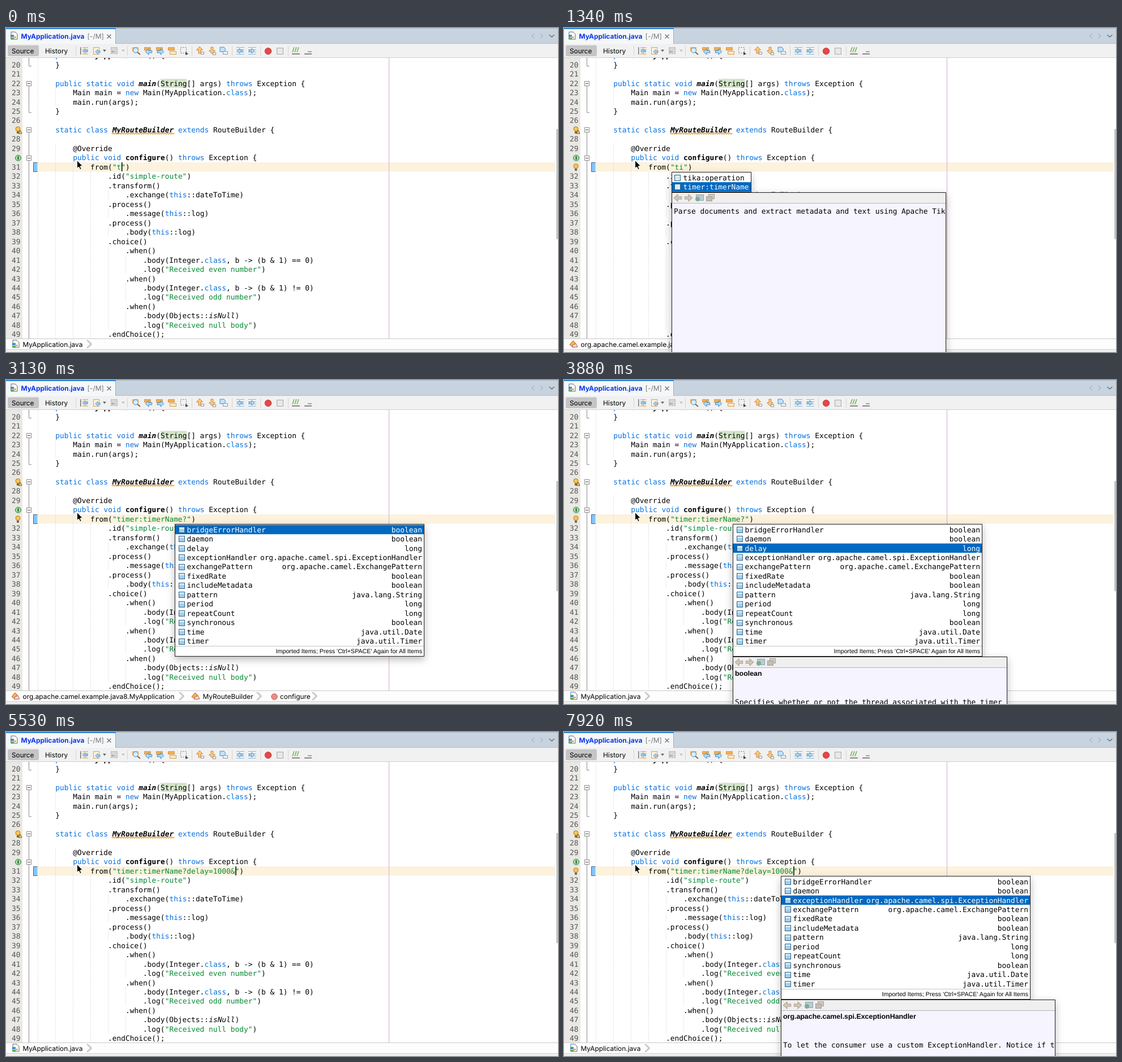
These frames come from a looping animation (975x574 px, 8000 ms). An HTML page with a canvas:

```html
<!DOCTYPE html>
<html lang="en">
<head>
<meta charset="utf-8">
<title>Code completion</title>
<style>
  html, body { margin: 0; width: 100%; height: 100%; overflow: hidden; background: #fff; }
  canvas { display: block; }
</style>
</head>
<body>
<canvas id="stage" width="975" height="574"></canvas>
<script>
const ctx = document.getElementById('stage').getContext('2d');
const LOOP = 8000, CHAR = 7.74, ROW = 16.475, LEFT = 56.3, FIRST_LINE = 19;
const MONO = '12.857px "DejaVu Sans Mono", monospace';
const SANS = '"Liberation Sans", Arial, sans-serif';
const UI = 'Inter, sans-serif';
const BLUE = '#0570df', GREEN = '#078a35', ORANGE = '#f5ad4e', ICON_BLUE = '#3d8fd1';

const source = `    private MyApplication() {
    }

    public static void main(String[] args) throws Exception {
        Main main = new Main(MyApplication.class);
        main.run(args);
    }

    static class MyRouteBuilder extends RouteBuilder {

        @Override
        public void configure() throws Exception {
            from("URI")
                .id("simple-route")
                .transform()
                    .exchange(this::dateToTime)
                .process()
                    .message(this::log)
                .process()
                    .body(this::log)
                .choice()
                    .when()
                        .body(Integer.class, b -> (b & 1) == 0)
                        .log("Received even number")
                    .when()
                        .body(Integer.class, b -> (b & 1) != 0)
                        .log("Received odd number")
                    .when()
                        .body(Objects::isNull)
                        .log("Received null body")
                .endChoice();`.split('\n');

const options = `bridgeErrorHandler boolean
daemon boolean
delay long
exceptionHandler org.apache.camel.spi.ExceptionHandler
exchangePattern org.apache.camel.ExchangePattern
fixedRate boolean
includeMetadata boolean
pattern java.lang.String
period long
repeatCount long
synchronous boolean
time java.util.Date
timer java.util.Timer`.split('\n').map(line => line.split(' '));

const docs = {
  tika: ['', 'Parse documents and extract metadata and text using Apache Tika.'],
  timer: ['', 'Generate messages in specified intervals using java.util.Timer.'],
  bridge: ['boolean', 'Allows for bridging the consumer to the Camel routing Error Handler'],
  daemon: ['boolean', 'Specifies whether or not the thread associated with the timer endpoint'],
  delay: ['long', 'Delay before first event is triggered.'],
  exception: ['org.apache.camel.spi.ExceptionHandler', 'To let the consumer use a custom ExceptionHandler. Notice if the']
};

const uriList = { x: 190, w: 141, items: [['tika:operation', ''], ['timer:timerName', '']] };
const fullList = { x: 298, w: 441, items: options, footer: true };
const restList = { x: 383, w: 441, items: options.filter(o => o[0] !== 'delay'), footer: true };
const closed = { list: null, doc: null, bulb: false, crumbs: false };

// Each step changes part of the editor state from its time on.
const steps = [
  [0, { uri: 't', ...closed }],
  [150, { uri: 'ti' }],
  [450, { crumbs: true, bulb: true }],
  [900, { list: uriList, sel: 0, doc: 'tika' }],
  [1340, { sel: 1 }],
  [1490, { doc: 'timer' }],
  [1930, { uri: 'timer:timerName', ...closed }],
  [2380, { crumbs: true, bulb: true }],
  [2830, { uri: 'timer:timerName?', ...closed }],
  [3130, { list: fullList, sel: 0, crumbs: true, bulb: true }],
  [3280, { crumbs: false }],
  [3430, { doc: 'bridge' }],
  [3580, { sel: 1 }],
  [3730, { doc: 'daemon' }],
  [3880, { sel: 2 }],
  [4030, { doc: 'delay' }],
  [4330, { uri: 'timer:timerName?delay=1000', ...closed }],
  [4630, { crumbs: true, bulb: true }],
  [5380, { crumbs: false, bulb: false }],
  [5530, { uri: 'timer:timerName?delay=1000&' }],
  [5830, { list: restList, sel: 0, bulb: true }],
  [6130, { doc: 'bridge' }],
  [6720, { sel: 1 }],
  [7020, { doc: 'daemon' }],
  [7320, { sel: 2 }],
  [7620, { doc: 'exception' }]
];
const blinkStarts = [0, 200, 1930, 2830, 4330, 5520];

const stateAt = t => Object.assign({}, ...steps.filter(s => s[0] <= t).map(s => s[1]));
const caretOn = t => {
  const start = blinkStarts.filter(b => b <= t).pop();
  return Math.floor((t - start) / 300) % 2 === 0;
};
const rowY = n => 65 + (n - 20) * ROW;
const colX = c => LEFT + c * CHAR;

function rect(x, y, w, h, fill) {
  ctx.fillStyle = fill;
  ctx.fillRect(x, y, w, h);
}
function frame(x, y, w, h, stroke, fill) {
  if (fill) rect(x, y, w, h, fill);
  ctx.strokeStyle = stroke;
  ctx.lineWidth = 1;
  ctx.strokeRect(x + .5, y + .5, w - 1, h - 1);
}
function line(points, stroke, width = 1) {
  ctx.beginPath();
  points.forEach(p => ctx.lineTo(...p));
  ctx.strokeStyle = stroke;
  ctx.lineWidth = width;
  ctx.stroke();
}
function shape(points, fill, stroke) {
  ctx.beginPath();
  points.forEach(p => ctx.lineTo(...p));
  ctx.closePath();
  ctx.fillStyle = fill;
  ctx.fill();
  if (stroke) { ctx.strokeStyle = stroke; ctx.lineWidth = 1; ctx.stroke(); }
}
function disc(x, y, r, fill, stroke) {
  ctx.beginPath();
  ctx.arc(x, y, r, 0, 7);
  ctx.fillStyle = fill;
  ctx.fill();
  if (stroke) { ctx.strokeStyle = stroke; ctx.lineWidth = 1; ctx.stroke(); }
}
// y is the middle of the capital letters.
function text(str, x, y, font, fill = '#000', align = 'left') {
  ctx.font = font;
  ctx.textAlign = align;
  ctx.fillStyle = fill;
  ctx.fillText(str, x, y + 4.6);
}
function clipped(x, y, w, h, draw) {
  ctx.save();
  ctx.beginPath();
  ctx.rect(x, y, w, h);
  ctx.clip();
  draw();
  ctx.restore();
}
// An arrow centred on x, y; turn counts quarter turns from pointing right.
function arrow(x, y, turn, fill, stroke, s = 1) {
  ctx.save();
  ctx.translate(x, y);
  ctx.rotate(turn * Math.PI / 2);
  ctx.scale(s, s);
  shape([[-6, -2], [0, -2], [0, -5.5], [6, 0], [0, 5.5], [0, 2], [-6, 2]], fill, stroke);
  ctx.restore();
}

function fileIcon(x, y) {
  shape([[x - 5, y - 7], [x + 2, y - 7], [x + 6, y - 3], [x + 6, y + 6], [x - 5, y + 6]], '#fff', '#5b6b7c');
  rect(x - 6, y - 2, 6, 4, ICON_BLUE);
  rect(x - 1, y + 1, 5, 3, ORANGE);
  rect(x - 6, y + 3, 6, 3, '#67a84b');
}
function classIcon(x, y) {
  shape([[x - 7, y + 1], [x - 1, y - 6], [x + 3, y - 2], [x - 2, y + 5]], '#f3b35a', '#a96a2a');
  shape([[x - 2, y + 2], [x + 4, y - 1], [x + 7, y + 5], [x - 2, y + 6]], '#f7d8cf', '#b55c48');
}
function bulbIcon(x, y) {
  disc(x, y - 1.5, 4, '#fbc54e', '#b9780f');
  rect(x - 2, y + 3, 4, 3.5, '#66605a');
}

function codeFont(word) {
  if (/^(main|MyRouteBuilder)$/.test(word)) return 'italic bold ' + MONO;
  if (/^(configure|MyApplication)$/.test(word)) return 'bold ' + MONO;
  return word === 'isNull' ? 'italic ' + MONO : MONO;
}
const tokens = /"[^"]*"|\b(?:private|public|static|void|throws|new|class|extends|this)\b|\bmain(?=\(S)|MyRouteBuilder|configure|MyApplication(?=\(\))|isNull|[^\s"]|\s+/g;

function codeLine(str, y) {
  let col = 0, run = '', runCol = 0;
  const flush = () => { if (run) text(run, colX(runCol), y, MONO); run = ''; };
  for (const token of str.match(tokens) || []) {
    if (token.length > 1 && token.trim()) {
      flush();
      const font = codeFont(token);
      const plain = font !== MONO;
      text(token, colX(col), y, font, token[0] === '"' ? GREEN : plain ? '#000' : BLUE);
    } else {
      if (!run) runCol = col;
      run += token;
    }
    col += token.length;
  }
  flush();
}

function foldColumn() {
  const gray = '#8c8c8c';
  const end = n => line([[40.5, rowY(n)], [40.5, rowY(n) + 2.5], [45, rowY(n) + 2.5]], gray);
  line([[40.5, 53], [40.5, rowY(20)]], gray);
  line([[40.5, rowY(22)], [40.5, rowY(25)]], gray);
  line([[40.5, rowY(27)], [40.5, 550]], gray);
  [20, 25].forEach(end);
  for (const n of [22, 27, 30]) {
    const y = Math.round(rowY(n));
    frame(36, y - 4, 9, 9, gray, '#fff');
    line([[38, y + .5], [43, y + .5]], '#444');
  }
}

function editor(state, t) {
  rect(0, 53, 975, 497, '#fff');
  rect(0, 53, 29, 497, '#e9e8e4');
  rect(57, 238, 913, 16.5, '#fcf2dd');
  rect(48, 238, 7.5, 17, '#83c5fb');
  line([[55.5, 238.5], [48.5, 238.5], [48.5, 254.5], [55.5, 254.5]], '#41678a');
  rect(273, 90, 46.5, 16, '#d3e5c9');

  let indent = 4;
  source.forEach((str, i) => {
    const n = FIRST_LINE + i, y = rowY(n);
    if (str) indent = str.search(/\S/);
    ctx.setLineDash([1, 1]);
    for (let c = 0; c < indent; c += 4) {
      const x = Math.round(colX(c)) + .5;
      line([[x, y - 8], [x, y + 8]], '#d9d9d9');
    }
    ctx.setLineDash([]);
    codeLine(str.replace('URI', state.uri), y);
    if (n === 27) bulbIcon(21, y);
    else if (n === 30) {
      disc(21.5, y + .5, 5, '#a9dba4', '#1c7a31');
      rect(20.6, y - 2.5, 1.9, 6, '#14602a');
    } else if (n === 31 && state.bulb) bulbIcon(21, y);
    else text(n, 10, y, MONO, '#555');
  });
  shape([[22, 187], [25, 181], [28, 187]], '#ffd84c', '#6d5210');

  const wave = [];
  for (let x = 187; x <= 297; x += 2) wave.push([x, x % 4 === 3 ? 188 : 186]);
  line(wave, '#ea9a22', 1.4);

  foldColumn();
  rect(676, 53, 1, 497, '#d8a9d0');
  rect(972, 179, 3, 195, '#c4c4c4');
  if (caretOn(t)) rect(colX(18 + state.uri.length) + .6, 238, 1.5, 16, '#000');
}

function tabBar() {
  rect(0, 0, 975, 28, '#c7d3df');
  rect(0, 0, 975, 1, '#aeb9c4');
  rect(0, 0, 194, 28, '#f5f7f9');
  rect(0, 0, 194, 2, '#2f86d8');
  rect(193, 2, 1, 26, '#a5b2be');
  rect(194, 27, 781, 1, '#b4bec8');
  fileIcon(14, 14);
  text('MyApplication.java', 26.5, 14, `bold 11.9px ${UI}`, '#0a36e8');
  text('[-/M]', 143.5, 14, `12px ${UI}`, '#777');
  line([[178.5, 11.5], [185.5, 18.5]], '#777', 1.4);
  line([[185.5, 11.5], [178.5, 18.5]], '#777', 1.4);
  line([[933, 10], [928.5, 14], [933, 18]], '#aab5bf', 1.2);
  line([[943.5, 10], [948, 14], [943.5, 18]], '#aab5bf', 1.2);
  line([[959.5, 12], [964, 16], [968.5, 12]], '#65717c', 1.4);
}

function toolbar() {
  rect(0, 28, 975, 25, '#f1f1f1');
  rect(0, 52, 975, 1, '#d0d0d0');
  ctx.beginPath();
  ctx.roundRect(3, 30.5, 55, 19.5, 3);
  ctx.fillStyle = '#c5c5c5';
  ctx.fill();
  text('Source', 10, 40, `11.8px ${UI}`);
  text('History', 69, 40, `11.9px ${UI}`);
  for (const x of [123, 214, 328, 399, 449, 498]) rect(x, 32, 1, 17, '#d4d4d4');

  rect(131, 34, 1.5, 13, '#777');
  for (let i = 0; i < 4; i++) rect(135, 34 + i * 3.7, 10, 1.5, ORANGE);
  arrow(140, 40.5, 2, '#9fd0f4', ICON_BLUE, .7);
  frame(154, 34, 11, 13, '#d9a35c', '#fdf0d8');
  arrow(162, 42, 2, '#9fd0f4', ICON_BLUE, .7);
  shape([[171, 38.5], [177, 38.5], [174, 42]], '#555');
  frame(185, 34, 12, 12, '#bbb', '#d6d6d6');
  arrow(189, 42, 2, '#aaa', '#eee', .7);
  shape([[204, 38.5], [210, 38.5], [207, 42]], '#bbb');

  rect(223, 34, 11, 7, ORANGE);
  line([[231, 42], [237, 47]], '#8a642f', 2);
  disc(229, 39.5, 4.5, '#d8eefc', ICON_BLUE);
  for (const [x, turn] of [[251, 2], [272, 0]]) {
    frame(x - 7, 34, 12, 6, '#d99c4a', ORANGE);
    arrow(x + 1, 42, turn, '#b5dcf8', '#2f86c8', .95);
  }
  frame(286, 34, 12, 6, '#d99c4a', ORANGE);
  frame(289, 41, 12, 6, '#d99c4a', '#fdeccb');
  ctx.setLineDash([2, 2]);
  frame(308, 34, 11, 11, '#777');
  ctx.setLineDash([]);
  shape([[317, 42], [322, 46], [317, 48]], '#444');

  arrow(342, 39, 3, '#fbc982', '#c98939', 1);
  arrow(364, 40, 1, '#fbc982', '#c98939', 1);
  frame(344, 42, 6, 5, '#999', '#f4f4f4');
  frame(365, 43, 6, 5, '#999', '#f4f4f4');
  shape([[378, 34], [385, 34], [388, 38], [385, 42], [378, 42]], '#c6e3f7', ICON_BLUE);
  frame(383, 41, 9, 6, '#999', '#f0f0f0');
  for (const [x, turn] of [[413, 2], [434, 0]]) {
    for (let i = 0; i < 4; i++) rect(x - 6, 34 + i * 4, 14, 1, '#8ab4d4');
    arrow(x, 40.5, turn, '#b5dcf8', '#2f86c8', .8);
  }
  disc(463, 41, 5.8, '#e34848', '#c94444');
  frame(478, 35, 12, 12, '#aaa', '#e8e8e8');
  for (let i = 0; i < 3; i++) line([[506 + i * 4, 43], [509 + i * 4, 34]], '#74b565', 1.6);
  rect(505, 45, 14, 2, '#888');
  rect(533, 41, 7, 2, '#a5a5a5');
  rect(527, 45, 13, 2, '#888');
}

function chevron(x) {
  line([[x - 4, 553], [x + 3, 560], [x - 4, 567]], '#a6a6a6', 1.3);
  line([[x - 1, 553], [x + 5, 560], [x - 1, 567]], '#cfcfcf', 1);
}
function breadcrumb(full) {
  const font = `11.9px ${UI}`;
  rect(0, 550, 975, 24, '#f0f0f0');
  rect(0, 550, 975, 20, '#fdfdfd');
  rect(0, 550, 975, 1, '#c9c9c9');
  rect(0, 569, 975, 1, '#cfcfcf');
  if (!full) {
    fileIcon(17, 560);
    text('MyApplication.java', 29.5, 560, font);
    chevron(147);
    return;
  }
  classIcon(17, 560);
  text('org.apache.camel.example.java8.MyApplication', 29.5, 560, font);
  chevron(310);
  classIcon(335, 560);
  text('MyRouteBuilder', 347.5, 560, font);
  chevron(447);
  disc(474, 561, 5.2, '#f08d88', '#c3534f');
  text('configure', 484, 560, font);
  chevron(545);
}

function panel(x, y, w, h, fill) {
  ctx.save();
  ctx.shadowColor = 'rgba(0,0,0,.28)';
  ctx.shadowBlur = 13;
  ctx.shadowOffsetY = 5;
  rect(x, y, w, h, fill);
  ctx.restore();
}

function completion({ list, sel, doc }) {
  const { x, w, items, footer } = list;
  const top = 255, bottom = Math.ceil(top + 2.5 + items.length * ROW + (footer ? 18 : 0));
  const nameX = x + (footer ? 21.5 : 20.5);

  if (doc) panel(x, bottom, 485, 300, '#f6f5ff');
  panel(x, top, w, bottom - top, '#fff');
  items.forEach(([name, type], i) => {
    const y = 265 + i * 16.46, on = i === sel;
    if (on) rect(x + 1, y - 8.3, w - 2, 16.5, '#0069c1');
    const iconX = x + (footer ? 7 : 5), iconY = Math.round(y) - 5;
    frame(iconX, iconY, 11, 11, '#35617f', footer ? '#9fd0f1' : '#d9ebf8');
    rect(iconX + 1, iconY + 1, 9, 3, '#d2ebfb');
    const color = on ? '#fff' : '#000';
    text(name, nameX, y, MONO, color);
    text(type, x + w - 4, y, MONO, color, 'right');
  });
  if (footer) {
    rect(x + 1, bottom - 19, w - 2, 1, '#c5c5c5');
    text('Imported Items; Press \'Ctrl+SPACE\' Again for All Items', x + w - 4, bottom - 10.5, `10.7px ${SANS}`, '#000', 'right');
  }
  frame(x, top, w, bottom - top, '#222');
  if (doc) documentation(x, bottom, docs[doc]);
}

function documentation(x, y, [type, body]) {
  rect(x, y, 485, 20, '#efefef');
  rect(x, y + 19, 485, 1, '#b6b6b6');
  arrow(x + 11, y + 10, 2, '#d2c6b7', '#b0a494', 1.1);
  arrow(x + 30, y + 10, 0, '#d2c6b7', '#b0a494', 1.1);
  frame(x + 43, y + 4, 14, 11, '#8fa2ab', '#bacbd2');
  disc(x + 46, y + 12, 4, '#7faa98');
  frame(x + 65, y + 3, 11, 9, '#a39c93', '#d2ccc5');
  frame(x + 61, y + 7, 11, 9, '#a39c93', '#c4bdb5');
  clipped(x, y, 484, 300, () => {
    if (type) text(type, x + 4, y + 29.2, `bold 12.4px ${SANS}`);
    text(body, x + 4, y + (type ? 80.7 : 33.2), MONO);
  });
  frame(x, y, 485, 300, '#222');
}

function pointer() {
  shape([[125.5, 234.5], [125.5, 248.5], [128.7, 246], [131, 250.8], [133.2, 249.8], [131, 245], [135, 244.3]], '#000', '#fff');
}

function draw(t) {
  const state = stateAt(t);
  ctx.textRendering = 'geometricPrecision';
  clipped(0, 53, 975, 497, () => editor(state, t));
  tabBar();
  toolbar();
  breadcrumb(state.crumbs);
  if (state.list) completion(state);
  pointer();
}

const begin = performance.now();
function tick() {
  draw((performance.now() - begin) % LOOP);
  requestAnimationFrame(tick);
}
tick();
</script>
</body>
</html>
```
